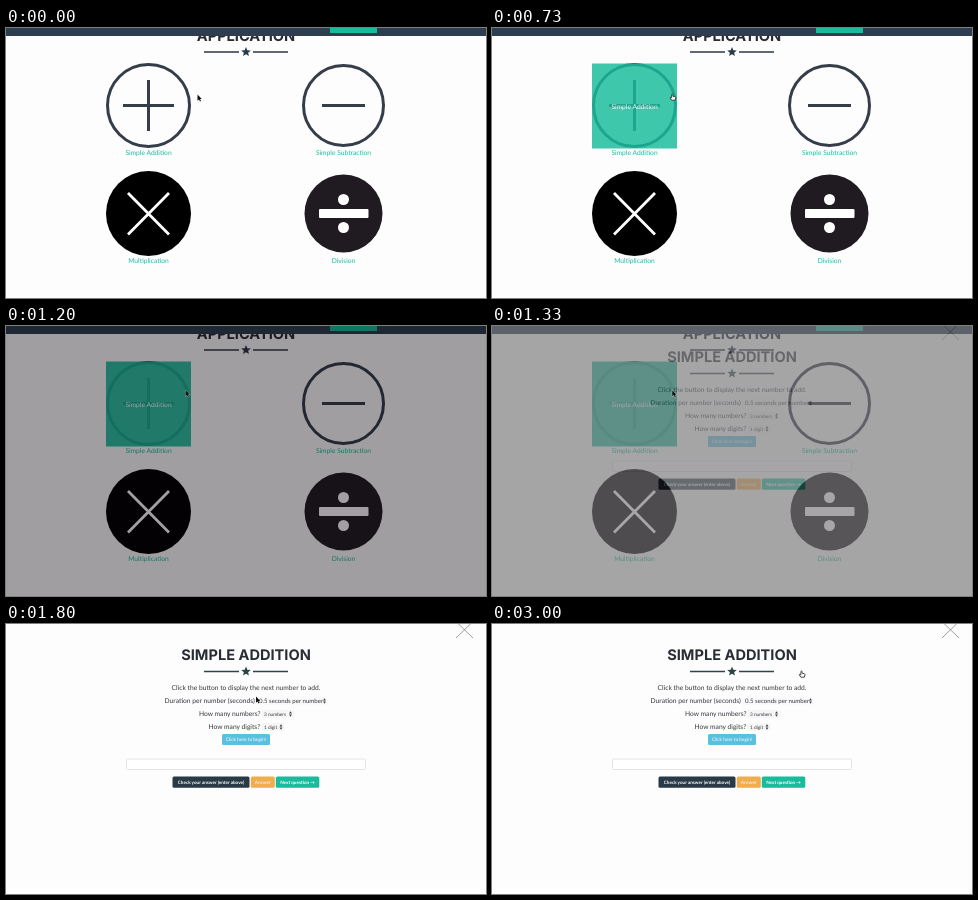
Recreate the animation shown at these times as an HTML page. Size 480 by 270 pixels, loop 3.07 s.

```html
<!DOCTYPE html>
<html lang="en">
<head>
<meta charset="utf-8">
<title>Arithmetic practice</title>
<style>
html, body { margin: 0; width: 100%; height: 100%; overflow: hidden; background: #fefdfe; }
svg { display: block; width: 480px; height: 270px; }
text { font-family: Lato, "Open Sans", sans-serif; font-size: 6.7px; fill: #33363c; text-rendering: geometricPrecision; }
.mid { text-anchor: middle; }
.title { font: 700 14.6px Inter, "Open Sans", sans-serif; text-anchor: middle; fill: #282c33; }
.label { fill: #18bc9c; text-anchor: middle; }
.light { fill: #fff; text-anchor: middle; }
.small { font-size: 4.75px; }
.button { font-size: 4.75px; fill: #fff; text-anchor: middle; }
.bold { font-size: 4.6px; font-weight: 700; }
.ring { fill: none; stroke: #343d48; stroke-width: 3; }
</style>
</head>
<body>
<svg viewBox="0 0 480 270">
  <defs>
    <g id="divider">
      <path d="M-42 0H-7M7 0H42" stroke="currentColor" stroke-width="1.7"/>
      <path id="star" fill="currentColor"/>
    </g>
    <path id="updown" d="M-1.4 -.6L0 -2.7L1.4 -.6ZM-1.4 .6L0 2.7L1.4 .6Z" fill="#343a42"/>
  </defs>
  <rect width="480" height="270" fill="#fefdfe"/>

  <g id="page">
    <text class="title" x="240" y="12.6">APPLICATION</text>
    <rect width="480" height="8" fill="#2c3e50"/>
    <rect x="324" width="47" height="5" fill="#18bc9c"/>
    <use href="#divider" x="240" y="24" color="#2c3a46"/>

    <circle class="ring" cx="142.5" cy="77.5" r="41"/>
    <path class="ring" d="M117 77.5H168M142.5 52V103"/>
    <circle class="ring" cx="337.5" cy="77.5" r="40"/>
    <path class="ring" d="M316 77.5H359"/>
    <circle cx="142.5" cy="185.5" r="42.5"/>
    <path d="M122 165L163 206.5M163 165L122 206.5" stroke="#fff" stroke-width="2.8"/>
    <circle cx="337.5" cy="185.5" r="39" fill="#1f1b20"/>
    <g fill="#fff">
      <rect x="313" y="181" width="49.5" height="9" rx="1"/>
      <circle cx="337.5" cy="171.5" r="5.5"/>
      <circle cx="337.5" cy="199.5" r="5.5"/>
    </g>

    <text class="label" x="142.5" y="127.4">Simple Addition</text>
    <text class="label" x="337.5" y="127.4">Simple Subtraction</text>
    <text class="label" x="142.5" y="235.4">Multiplication</text>
    <text class="label" x="337.5" y="235.4">Division</text>

    <g id="hover">
      <rect x="100" y="35.5" width="85" height="85" fill="#18bc9c" opacity=".9"/>
      <text class="light" x="142.5" y="80.7">Simple Addition</text>
    </g>
  </g>

  <rect id="backdrop" width="480" height="270" fill="#080408"/>

  <g id="modal">
    <rect width="480" height="270" fill="#fefdfe"/>
    <path d="M450 -2.5L467 14M467 -2.5L450 14" stroke="#666a70" stroke-width=".65"/>
    <text class="title" x="240" y="36">SIMPLE ADDITION</text>
    <use href="#divider" x="240" y="47.5" color="#2b4647"/>
    <text class="mid" x="240" y="66">Click the button to display the next number to add.</text>

    <text x="158.5" y="78.8">Duration per number (seconds)</text>
    <rect x="251" y="72.5" width="71" height="8.5" rx="1.5" fill="#fafafa"/>
    <text x="253" y="78.8" style="font-size:6.1px">0.5 seconds per number</text>
    <use href="#updown" x="318.5" y="77"/>

    <text x="193" y="92">How many numbers?</text>
    <rect x="255.5" y="86" width="33" height="8" rx="1.5" fill="#f6f6f6"/>
    <text class="small" x="258" y="91.8">3 numbers</text>
    <use href="#updown" x="284.5" y="90"/>

    <text x="202.5" y="105">How many digits?</text>
    <rect x="255.5" y="99" width="23" height="8" rx="1.5" fill="#f6f6f6"/>
    <text class="small" x="258" y="104.8">1 digit</text>
    <use href="#updown" x="275" y="103"/>

    <rect x="216" y="110" width="48" height="11" rx="1.5" fill="#5bc0de"/>
    <text class="button" x="240" y="117.2">Click here to begin!</text>
    <rect x="120.5" y="135" width="239" height="10.5" rx="1" fill="#fff" stroke="#dedde0" stroke-width=".8"/>

    <rect x="166.5" y="152.5" width="77" height="11.2" rx="1.5" fill="#283a46"/>
    <text class="button bold" x="205" y="159.7">Check your answer (enter above)</text>
    <rect x="244.8" y="152.5" width="24" height="11.2" rx="1.5" fill="#f0ad4e"/>
    <text class="button" x="256.7" y="159.7">Answer</text>
    <rect x="269.8" y="152.5" width="43.5" height="11.2" rx="1.5" fill="#18bc9c"/>
    <text class="button bold" x="291.5" y="159.7">Next question →</text>
  </g>

  <g id="cursor" stroke-linejoin="round">
    <path id="arrow" d="M0 0V6.2L1.5 4.9L2.5 7.1L3.5 6.6L2.5 4.5H4.3Z" fill="#111" stroke="#fff" stroke-width=".5" paint-order="stroke"/>
    <path id="hand" d="M-.6 .4Q0 -.4 .6 .4V2.2L3 2.8Q3.6 3 3.4 4L2.9 6.2H-.7L-2.3 3.6Q-2 2.8 -.6 3.8Z"
      fill="#fff" stroke="#222" stroke-width=".8"/>
  </g>
</svg>
<script>
const LOOP = 3070, STEP = 200 / 3;
const el = id => document.getElementById(id);

// Each track is a list of [time, ...values], linear in between.
const hoverTrack = [[470, 0], [530, .25], [600, .6], [670, .82], [730, .92], [870, 1]];
const backdropTrack = [[900, 0], [1200, .38], [1330, .5]];
const modalTrack = [[1200, 0], [1330, .29], [1470, .54], [1670, .9], [1800, 1]];
const cursorTrack = [
  [400, 191.5, 66.5], [600, 181, 66], [800, 180, 66], [930, 179.5, 64], [1330, 179.5, 64],
  [1470, 211.5, 70], [1800, 250, 72.5], [1930, 257, 72], [2070, 258, 71],
  [2330, 288, 57], [2530, 307, 48], [2730, 309.5, 47], [3000, 309.5, 47]
];

function sample(track, t) {
  const next = track.findIndex(key => key[0] > t);
  if (next < 0) return track[track.length - 1].slice(1);
  if (next === 0) return track[0].slice(1);
  const a = track[next - 1], b = track[next];
  const p = (t - a[0]) / (b[0] - a[0]);
  return a.slice(1).map((v, i) => v + (b[i + 1] - v) * p);
}

function starPath(radius) {
  const points = Array.from({ length: 10 }, (_, i) => {
    const r = i % 2 ? radius * .45 : radius;
    const angle = Math.PI * (i / 5 - .5);
    return `${(r * Math.cos(angle)).toFixed(2)} ${(r * Math.sin(angle)).toFixed(2)}`;
  });
  return `M${points.join("L")}Z`;
}

function render(time) {
  // The picture advances 15 times per second.
  const t = Math.floor((time % LOOP + 4) / STEP) * STEP;
  el("hover").setAttribute("opacity", sample(hoverTrack, t)[0]);
  el("backdrop").setAttribute("opacity", sample(backdropTrack, t)[0]);
  el("modal").setAttribute("opacity", sample(modalTrack, t)[0]);
  const [x, y] = sample(cursorTrack, t);
  el("cursor").setAttribute("transform", `translate(${x} ${y})`);
  const pointing = (t > 500 && t < 970) || t > 2500;
  el("hand").setAttribute("display", pointing ? "inline" : "none");
  el("arrow").setAttribute("display", pointing ? "none" : "inline");
}

el("star").setAttribute("d", starPath(5));
const start = performance.now();
function tick() {
  render(performance.now() - start);
  requestAnimationFrame(tick);
}
tick();
</script>
</body>
</html>
```
